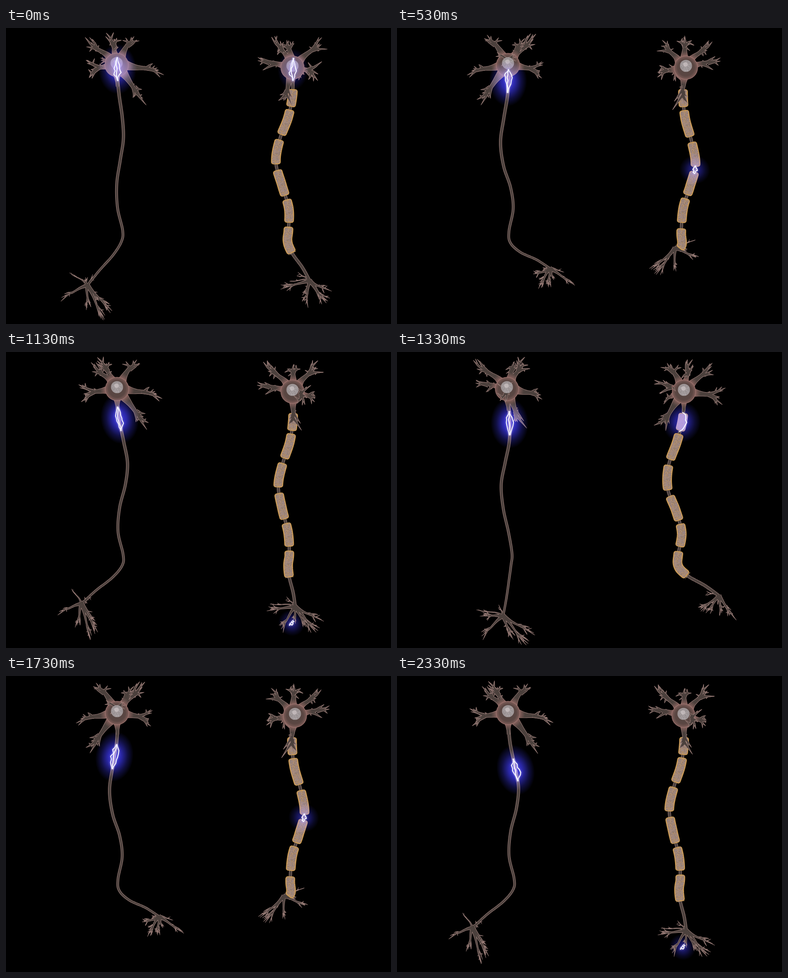
Write an HTML page with a canvas that moves like this. It is 853 by 657 pixels and loops after 2390 ms.

```html
<!DOCTYPE html>
<html lang="en">
<head>
<meta charset="utf-8">
<title>Signal conduction in two nerve cells</title>
<style>
html, body { margin: 0; width: 100%; height: 100%; overflow: hidden; background: #000; }
canvas { display: block; }
</style>
</head>
<body>
<canvas id="stage" width="853" height="657"></canvas>
<script>
const ctx = document.getElementById('stage').getContext('2d');
const LOOP = 2390, STEPS = 36, TURN = 18, DEPTH = 950, EYE_Y = 120;
const RIM = '#9c7f7a', CORE = '#4c413d';

function seeded(seed) {
  return () => {
    seed = (seed + 0x6D2B79F5) | 0;
    let v = Math.imul(seed ^ (seed >>> 15), 1 | seed);
    v = (v + Math.imul(v ^ (v >>> 7), 61 | v)) ^ v;
    return ((v ^ (v >>> 14)) >>> 0) / 4294967296;
  };
}

const mix = (a, b, u) => a + (b - a) * u;
const lerp = (a, b, u) => a.map((v, i) => mix(v, b[i], u));
const add = (a, b) => a.map((v, i) => v + b[i]);
const turnAngle = step => step * 2 * Math.PI / TURN;

// A point at radius r that faces the viewer when the turn reaches `front`.
const polar = (r, front, y) => {
  const a = turnAngle(front);
  return [-r * Math.sin(a), y, r * Math.cos(a)];
};

// Axon course: height, radius, facing step
const knots = [
  [60, 0, 0], [90, 0, 0], [110, 0, 0], [150, 3, 13], [200, 14, 11], [250, 31, 10],
  [300, 35, 9.2], [350, 19, 8], [400, 6, 5.5], [450, 6, 11.5], [475, 5, 10],
  [499, 19, 3], [522, 58, 2.6], [546, 90, 2.6]
].map(([y, r, f]) => polar(r, f, y));

function spline(points, perSpan) {
  const out = [];
  const at = i => points[Math.max(0, Math.min(points.length - 1, i))];
  for (let i = 0; i < points.length - 1; i++) {
    const [a, b, c, d] = [at(i - 1), at(i), at(i + 1), at(i + 2)];
    for (let j = 0; j < perSpan; j++) {
      const u = j / perSpan;
      out.push(b.map((v, k) => v + 0.5 * u * (c[k] - a[k] +
        u * (2 * a[k] - 5 * v + 4 * c[k] - d[k] + u * (3 * (v - c[k]) + d[k] - a[k])))));
    }
  }
  out.push(points[points.length - 1]);
  return out;
}
const course = spline(knots, 20);

function grow(limbs, rand, origin, tip, width, spread, forks) {
  const jitter = s => [0, 0, 0].map(() => (rand() - 0.5) * 2 * s);
  const knot = add(lerp(origin, tip, 0.58), jitter(spread * 0.12));
  const limb = (pts, w0, w1, flare) => limbs.push({ pts: spline(pts, 5), w0, w1, flare });
  const thorn = (from, to, w) =>
    limb([from, add(lerp(from, to, 0.35), jitter(spread * 0.6))], w, 0.6, 1);
  const half = add(lerp(origin, knot, 0.5), jitter(2));
  limb([origin, half, knot], width, width * 0.36, 2);
  thorn(lerp(half, knot, 0.6), tip, width * 0.22);
  for (let i = 0; i < forks; i++) {
    const start = i < 3 ? knot : lerp(origin, tip, 0.52 + rand() * 0.3);
    const end = i ? add(lerp(origin, tip, 0.84 + rand() * 0.18), jitter(spread)) : tip;
    const mid = add(lerp(start, end, 0.5), jitter(spread * 0.12));
    limb([start, mid, end], width * 0.36, 0.7, 1.15);
    thorn(mid, end, width * 0.2);
  }
}

// Radius, facing step, height from the cell centre
const dendrites = [];
const dendriteRand = seeded(11);
[[92, 13.8, 14], [60, 12, 78], [46, 12, -64], [60, 0.3, -50],
 [62, 5.5, -46], [80, 2.2, 14], [66, 8, -9]].forEach(([r, f, y]) =>
  grow(dendrites, dendriteRand, polar(r * 0.2, f, y * 0.2), polar(r, f, y), 25, 19, 7));

// The same for the terminal, from its hub
const terminals = [];
const terminalRand = seeded(5);
[[46, 15.7, 58], [62, 15.2, 38], [55, 4.5, 26], [55, 8.5, 14], [54, 6.5, -12],
 [26, 12, 38], [26, 0, 36], [28, 10, -12]].forEach(([r, f, y]) =>
  grow(terminals, terminalRand, [0, 0, 0], polar(r, f, y), y < 0 ? 6 : 11, 9, y < 0 ? 2 : 5));

const sheaths = [[136, 175], [182, 239], [250, 304], [316, 371], [379, 432], [443, 495]];
const speckRand = seeded(29);
const specks = Array.from({ length: 340 }, () => ({
  u: speckRand(), v: speckRand() * 2 - 1,
  color: ['#c2965c', '#8d8290', '#8f7660', '#b08f80'][Math.floor(speckRand() * 4)]
}));

const cells = [
  { x: 247, somaX: 246, soma: 80, lean: 0.02, ahead: 0, squeeze: 1, sheathed: false },
  { x: 635.5, somaX: 637.5, soma: 86, lean: -0.02, ahead: 4, squeeze: 0.71, sheathed: true }
];

function projector(cell, step) {
  const a = turnAngle(step + cell.ahead), c = Math.cos(a), s = Math.sin(a);
  return ([x, y, z]) => {
    const depth = z * c - x * s, scale = 1 + depth / DEPTH;
    return {
      x: cell.x + cell.lean * (y - 110) + (x * c + z * s) * scale,
      y: EYE_Y + (y - EYE_Y) * scale, level: y, depth
    };
  };
}

function normal(pts, i) {
  const a = pts[Math.max(0, i - 1)], b = pts[Math.min(pts.length - 1, i + 1)];
  const d = Math.hypot(b.x - a.x, b.y - a.y) || 1;
  return { x: (a.y - b.y) / d, y: (b.x - a.x) / d };
}

function ribbon(pts, widthAt) {
  const path = new Path2D(), back = [];
  pts.forEach((p, i) => {
    const n = normal(pts, i), h = Math.max(0, widthAt(i / (pts.length - 1))) / 2;
    path.lineTo(p.x + n.x * h, p.y + n.y * h);
    back.unshift([p.x - n.x * h, p.y - n.y * h]);
  });
  back.forEach(([x, y]) => path.lineTo(x, y));
  path.closePath();
  return path;
}

function fill(path, style) {
  ctx.fillStyle = style;
  ctx.fill(path);
}

function disc(x, y, r, style) {
  ctx.fillStyle = style;
  ctx.beginPath();
  ctx.arc(x, y, r, 0, 7);
  ctx.fill();
}

function rimmed(shapes) {
  for (const { pts, width } of shapes) fill(ribbon(pts, width), RIM);
  for (const { pts, width } of shapes) fill(ribbon(pts, u => width(u) - 1.9), CORE);
}

function branches(limbs, origin, project) {
  return limbs.map(({ pts, w0, w1, flare }) => ({
    pts: pts.map(p => project(add(p, origin))),
    width: u => mix(w1, w0, Math.pow(1 - u, flare))
  }));
}

const between = (pts, top, bottom) => pts.filter(p => p.level >= top && p.level <= bottom);

// Evenly spaced points of a line between two levels
function resample(pts, top, bottom, count) {
  return Array.from({ length: count }, (_, i) => {
    const level = mix(top, bottom, i / (count - 1));
    const j = pts.findIndex(p => p.level > level);
    const p = pts[j - 1], q = pts[j], u = (level - p.level) / (q.level - p.level);
    return { x: mix(p.x, q.x, u), y: mix(p.y, q.y, u) };
  });
}

function drawSheath(axon, top, bottom) {
  const body = ribbon(resample(axon, top + 5, bottom - 5, 24), () => 11);
  ctx.lineJoin = 'round';
  for (const [color, w] of [['#d6a253', 10.5], ['#bb9160', 7.6], ['#a2887a', 5]]) {
    ctx.lineWidth = w;
    ctx.strokeStyle = color;
    ctx.stroke(body);
    fill(body, color);
  }
  const line = resample(axon, top + 2, bottom - 2, 40);
  for (const { u, v, color } of specks) {
    const i = Math.floor(u * line.length), n = normal(line, i);
    ctx.fillStyle = color;
    ctx.fillRect(line[i].x + n.x * v * 8.6 - 0.6, line[i].y + n.y * v * 8.6 - 0.6, 1.3, 1.3);
  }
}

function drawNucleus(x, y) {
  disc(x, y, 13.3, 'rgba(190,184,186,.8)');
  disc(x, y, 12.5, 'rgba(150,143,144,.8)');
  disc(x - 1, y - 3, 5, 'rgba(205,197,196,.7)');
  ctx.fillStyle = 'rgba(220,216,218,.4)';
  for (const { u, v } of specks.slice(0, 60)) {
    const a = u * 6.283, r = 12 * Math.sqrt(Math.abs(v));
    ctx.fillRect(x + r * Math.cos(a), y + r * Math.sin(a), 1.2, 1.2);
  }
}

function drawSoma(cell, step, project) {
  const x = cell.somaX + 2.8 * Math.sin(turnAngle(step + cell.ahead - 8)), y = cell.soma;
  const limbs = branches(dendrites, [0, y, 0], project);
  const hillock = {
    pts: [0, 0.25, 0.5, 0.75, 1].map(u => ({ x: mix(x, cell.x, u), y: mix(y + 12, 130, u) })),
    width: u => 7 + 26 * Math.pow(1 - u, 2.4)
  };
  rimmed([...limbs, hillock]);
  disc(x, y + 2, 26.5, RIM);
  disc(x, y + 2, 25.5, CORE);
  const shade = ctx.createRadialGradient(x, y + 2, 8, x, y + 2, 38);
  [[0, 'rgba(96,74,70,.5)'], [0.35, 'rgba(100,74,70,.6)'], [0.62, 'rgba(165,115,110,.62)'],
   [1, 'rgba(150,105,100,0)']].forEach(([at, color]) => shade.addColorStop(at, color));
  ctx.globalCompositeOperation = 'source-atop';
  disc(x, y + 2, 38, shade);
  ctx.globalCompositeOperation = 'source-over';
  rimmed(limbs.filter(l => l.pts[0].depth > 24 && l.pts[l.pts.length - 1].depth > 30));
  drawNucleus(x, y - 2);
}

function drawCell(cell, step) {
  const project = projector(cell, step);
  const settle = ([x, y, z]) => [x, y > 480 ? 480 + (y - 480) * cell.squeeze : y, z];
  const axon = course.map(p => project(settle(p)));
  const hub = settle(knots[knots.length - 1]);
  rimmed([...branches(terminals, hub, project),
    { pts: axon.filter(p => p.level > 104), width: u => cell.sheathed ? 7 : mix(7.5, 5, u) }]);
  if (cell.sheathed) sheaths.forEach(([top, bottom]) => drawSheath(axon, top, bottom));
  drawSoma(cell, step, project);
  return axon;
}

// Span of the hopping signal for every step of a turn
const hops = [[68, 114], [98, 136], sheaths[0], [173, 184], sheaths[1], [237, 252], sheaths[2],
  [302, 316], [304, 318], sheaths[3], sheaths[3], [369, 381], sheaths[4], [430, 445],
  sheaths[5], [496, 511], [511, 527]];

function signalFor(cell, axon, frame) {
  if (!cell.sheathed) {
    const top = 65 + 3.35 * frame;
    return { pts: between(axon, top, top + 53), rx: 42, ry: 56, power: 1,
      tint: [44, 46], flat: 0.1, strands: [-9, 8, 2] };
  }
  const step = frame % TURN, hop = hops[step];
  if (!hop) {
    const { x, y } = axon[axon.length - 1];
    return { pts: [0, 0.35, 0.7, 1].map(u => ({ x: x - 4 - 9 * u, y: y + 32 + 9 * u })),
      rx: 30, ry: 28, power: 0.55, tint: [14, 14], flat: 0.1, strands: [2, -3] };
  }
  const length = hop[1] - hop[0], covered = sheaths.includes(hop), inSoma = step === 0;
  return {
    pts: between(axon, hop[0] - 2, hop[1] + 3),
    rx: covered ? 42 : 34, ry: covered ? length / 2 + 26 : Math.max(32, length),
    power: covered ? 0.8 : 0.6,
    tint: covered ? [26, length * 0.58] : [36, 38],
    flat: covered ? 0.75 : 0.05,
    strands: covered ? [step % 4 ? -11 : 11] : inSoma ? [-9, 9, 4] : [-5, 5]
  };
}

function halo(signal, rx, ry, stops, mode) {
  const a = signal.pts[0], b = signal.pts[signal.pts.length - 1];
  ctx.save();
  ctx.globalCompositeOperation = mode;
  ctx.translate((a.x + b.x) / 2, (a.y + b.y) / 2);
  ctx.rotate(Math.atan2(b.y - a.y, b.x - a.x) - Math.PI / 2);
  ctx.scale(rx, ry);
  const g = ctx.createRadialGradient(0, 0, 0, 0, 0, 1);
  stops.forEach(([at, color]) => g.addColorStop(at, color));
  disc(0, 0, 1, g);
  ctx.restore();
}

function drawBolts({ pts, strands }, seed) {
  const rand = seeded(seed), count = 8;
  ctx.strokeStyle = '#fff';
  ctx.lineWidth = 2;
  ctx.lineJoin = ctx.lineCap = 'round';
  ctx.shadowColor = '#a9a0ff';
  ctx.shadowBlur = 4;
  for (const side of strands) {
    ctx.beginPath();
    for (let i = 0; i <= count; i++) {
      const j = Math.round(i / count * (pts.length - 1)), n = normal(pts, j);
      const off = side * Math.sin(Math.PI * i / count) * (0.6 + rand() * 0.5) + (rand() - 0.5) * 3;
      ctx.lineTo(pts[j].x + n.x * off, pts[j].y + n.y * off);
    }
    ctx.stroke();
  }
  ctx.shadowBlur = 0;
}

function draw(frame) {
  ctx.clearRect(0, 0, 853, 657);
  const step = frame % TURN;
  const signals = cells.map(cell => signalFor(cell, drawCell(cell, step), frame));
  for (const s of signals) {
    const lilac = a => `rgba(188,164,255,${a * Math.min(1, s.power + 0.1)})`;
    halo(s, ...s.tint, [[0, lilac(0.85)], [s.flat, lilac(0.8)], [1, lilac(0)]], 'source-atop');
  }
  for (const s of signals) {
    const blue = a => `rgba(60,56,235,${a * s.power})`;
    halo(s, s.rx, s.ry, [[0, blue(0.95)], [0.35, blue(0.72)], [0.7, blue(0.27)], [1, blue(0)]],
      'destination-over');
  }
  signals.forEach((s, i) => drawBolts(s, 100 + (i ? step : frame) * 7 + i));
}

let shown = -1;
function tick(now) {
  const time = Math.floor((now % LOOP) / 10) * 10;
  const frame = Math.min(STEPS - 1, Math.floor((time + 3.4) * 3 / 200));
  if (frame !== shown) draw(shown = frame);
  requestAnimationFrame(tick);
}
tick(performance.now());
</script>
</body>
</html>
```
